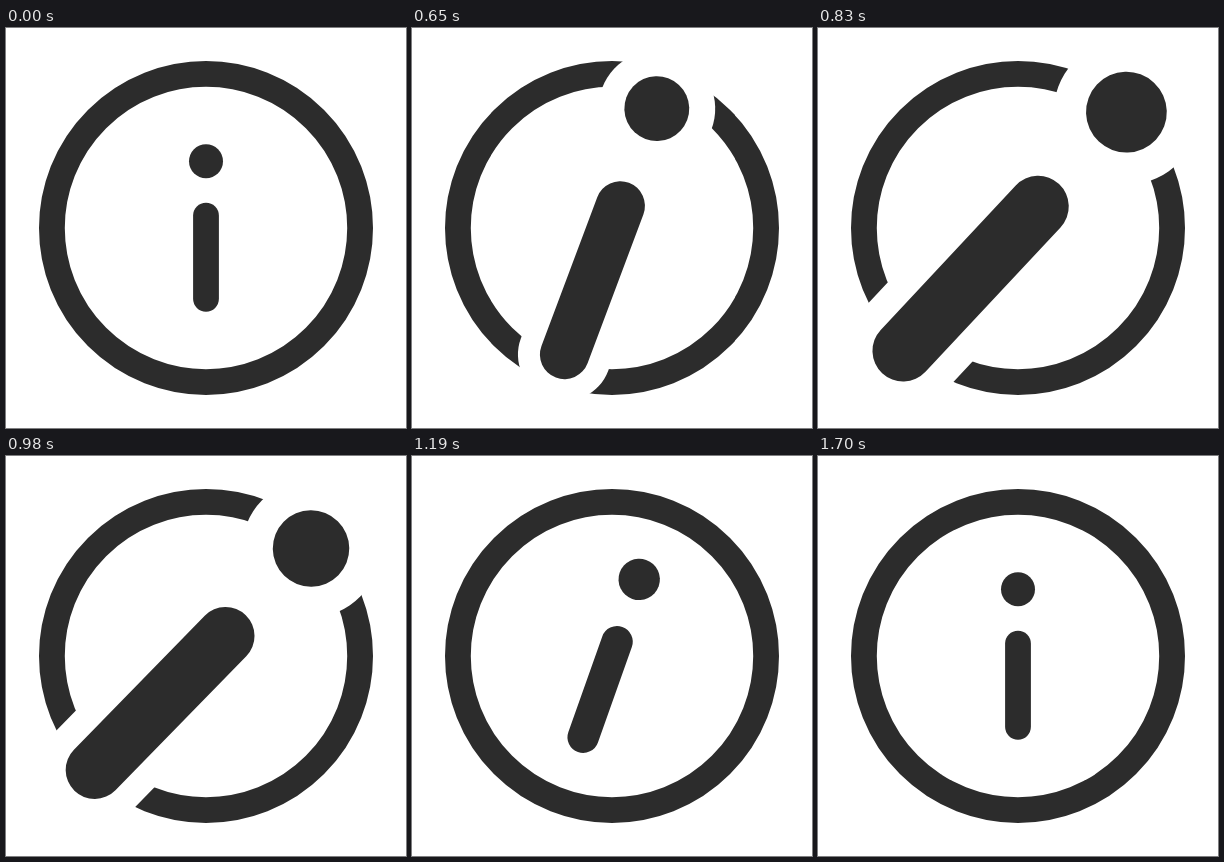
Write an HTML page that moves like this. It is 400x400 px and loops after 1.76 s.

```html
<!DOCTYPE html>
<html lang="en">
<head>
<meta charset="utf-8">
<title>Info icon</title>
<style>
  html, body { margin: 0; width: 100%; height: 100%; overflow: hidden; background: #fff; }
  svg { display: block; width: 100%; height: 100%; }
  .ink { fill: #2c2c2c; }
  .ink-line { fill: none; stroke: #2c2c2c; stroke-width: 25.8; stroke-linecap: round; }
  .gap { fill: #fff; }
  .gap-line { stroke: #fff; stroke-width: 48.8; stroke-linecap: round; }
</style>
</head>
<body>
<svg viewBox="0 0 400 400">
  <circle class="ink-line" cx="200" cy="200" r="154.1"/>
  <g id="letter">
    <circle class="gap" cy="-66.8" r="30.6"/>
    <path class="gap-line" d="M0-12.4V70.8"/>
    <circle class="ink" cy="-66.8" r="17"/>
    <path class="ink-line" d="M0-12.4V70.8"/>
  </g>
</svg>
<script>
const LOOP = 1760, DELAY = 500, STEP = 30, LAST_STEP = 40;
const letter = document.getElementById('letter');

// Each key: step, value, and the x handles of the easing leading to it.
const scaleKeys = [[0, 1], [12, 2.38, .5, .12], [28, .802, .55, .61], [40, 1, .35, .35]];
const angleKeys = [[0, 0], [14, 44.8, .36, .31], [30, -15, .87, .35], [40, 0, .35, .35]];

// Cubic Bezier easing with flat ends: (x1, 0, x2, 1).
function ease(x, x1, x2) {
  let low = 0, high = 1;
  for (let i = 0; i < 24; i++) {
    const u = (low + high) / 2, v = 1 - u;
    if (3 * v * v * u * x1 + 3 * v * u * u * x2 + u ** 3 < x) low = u;
    else high = u;
  }
  return low * low * (3 - 2 * low);
}

function valueAt(keys, step) {
  const next = Math.max(1, keys.findIndex(key => key[0] >= step));
  const [start, from] = keys[next - 1];
  const [end, to, x1, x2] = keys[next];
  if (step === start) return from;
  if (step === end) return to;
  return from + (to - from) * ease((step - start) / (end - start), x1, x2);
}

function draw(time) {
  const elapsed = Math.max(0, time % LOOP - DELAY);
  const step = Math.min(LAST_STEP, Math.floor(elapsed / STEP));
  const angle = valueAt(angleKeys, step), scale = valueAt(scaleKeys, step);
  letter.setAttribute('transform', `translate(200 200) rotate(${angle}) scale(${scale})`);
}

const begin = performance.now();
function tick() {
  draw(performance.now() - begin);
  requestAnimationFrame(tick);
}
tick();
</script>
</body>
</html>
```
